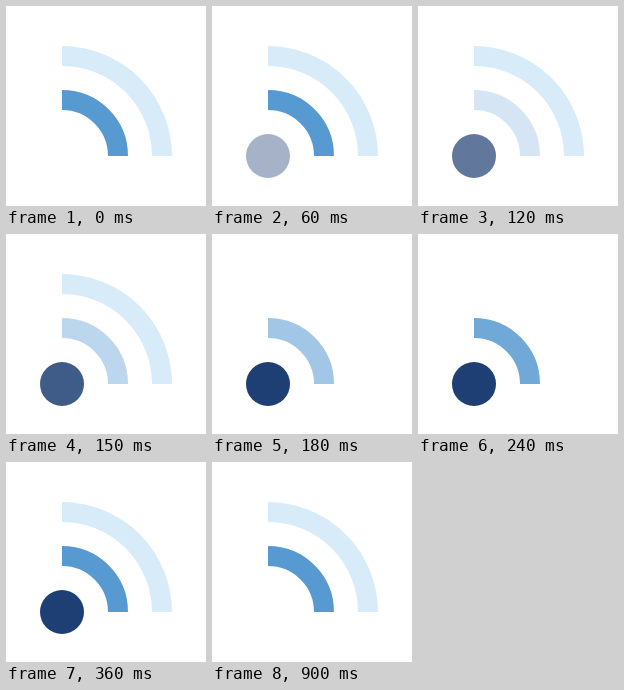
An HTML page that plays this animation: 200x200 px, repeating every 0.93 s.

```html
<!DOCTYPE html>
<html lang="en">
<head>
<meta charset="utf-8">
<title>Signal</title>
<style>
  html, body { margin: 0; width: 100%; height: 100%; overflow: hidden; background: #fff; }
  svg { display: block; width: 100vw; height: 100vh; }
</style>
</head>
<body>
<svg viewBox="0 0 200 200" fill="none" stroke-width="20">
  <circle id="dot" cx="56" cy="150" r="22" fill="#1e3f73"/>
  <path id="inner" d="M56 94A56 56 0 0 1 112 150" stroke="#5799d1"/>
  <path id="outer" d="M56 50A100 100 0 0 1 156 150" stroke="#d8ebf8"/>
</svg>
<script>
  const LOOP = 930, STEP = 30;

  // Each part vanishes at `start`, then fades in; `blank` steps stay empty.
  const parts = [
    { id: 'dot', start: 0, blank: 1 },
    { id: 'inner', start: 90, blank: 1 },
    { id: 'outer', start: 180, blank: 3 }
  ].map(part => ({ ...part, node: document.getElementById(part.id) }));

  function opacity({ id, start, blank }, time) {
    if (id === 'dot' && time >= 900) return 0;
    const step = Math.floor((time - start) / STEP);
    if (step < 0) return 1;
    return step < blank ? 0 : Math.min(1, 0.1 + 0.15 * step);
  }

  function draw(time) {
    for (const part of parts) {
      part.node.setAttribute('opacity', opacity(part, time));
    }
  }

  const origin = performance.now();
  function tick() {
    draw((performance.now() - origin) % LOOP);
    requestAnimationFrame(tick);
  }
  draw(0);
  requestAnimationFrame(tick);
</script>
</body>
</html>
```
